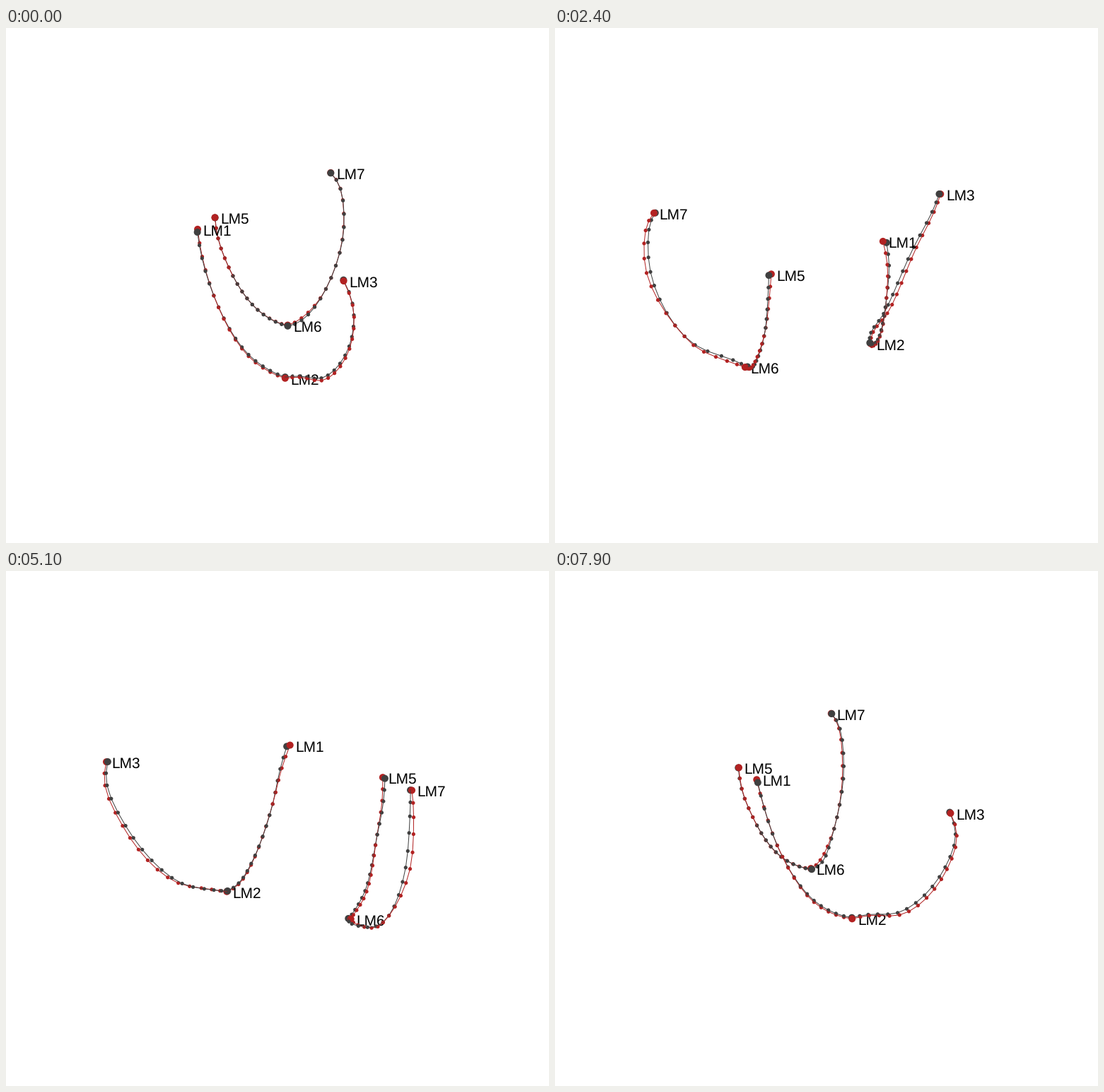
Write a matplotlib script that moves like this. It is 768x729 px and loops after 8000 ms.

```python
import numpy as np
import matplotlib.pyplot as plt
from matplotlib.animation import FuncAnimation

W, H, DPI = 768, 729, 100
FRAMES, STEP_MS = 80, 100
TURN = 2 * np.pi * 8 / 60 * STEP_MS / 1000         # 8 turns per minute
TILT = np.radians(20)
CAMERA = H / 2 / np.tan(np.radians(15))            # 30 degree field of view
RED, GREY = "#b22222", "#404040"
PX = 72 / DPI

plt.rcParams["text.hinting"] = "none"


def spline(knots, values, t):
    """Cubic Hermite curve through the values given at the knots."""
    knots, values = np.array(knots, float), np.array(values, float)
    slope = np.gradient(values, knots, axis=0, edge_order=2)
    i = np.clip(np.searchsorted(knots, t, "right") - 1, 0, len(knots) - 2)
    h = (knots[i + 1] - knots[i])[:, None]
    s = (t - knots[i])[:, None] / h
    return ((1 + 2 * s) * (1 - s) ** 2 * values[i]
            + s * (1 - s) ** 2 * h * slope[i]
            + s * s * (3 - 2 * s) * values[i + 1]
            + s * s * (s - 1) * h * slope[i + 1])


# An arch is two smooth halves of 17 points that meet in a kink.
HALF = [0, 2, 5, 11, 14, 16]
ARCH_A = [(-108, 89.5, 35.5), (-102, 55, 43.5), (-87, 3, 49), (-40, -79, 62.5),
          (-10, -100.5, 68.5), (10.5, -106.5, 76.5), (30, -99.5, 88.5),
          (58, -85, 125), (91, 4, 194.5), (88, 59, 224), (76.5, 90, 228.5)]
ARCH_B = [(-94.5, 64, -124.5), (-90.5, 31, -125), (-75, -15, -123),
          (-31, -85.5, -123), (-3, -104, -119), (16, -110, -116.5),
          (38, -106, -130), (69.5, -86.5, -175.5), (108, 19.5, -223.5),
          (101, 83.5, -223.5), (84.5, 111, -217.5)]

# Height and depth by which the red arch strays from the grey one.
STRAY = [0, 5, 12, 16, 18, 22, 28, 32]
STRAY_A = [(2.5, -5.3), (.2, 0), (-2.4, .3), (-1.2, 1.2),
           (.2, 3.7), (-.7, 7), (-.9, 4.5), (-.4, 2.3)]
STRAY_B = [(1.2, 3.3), (0, .3), (-.7, -2.6), (0, -3.6),
           (.2, -9), (0, -.4), (-.8, -6), (0, -1.8)]


def arch(keys):
    t = np.arange(17)
    return np.vstack([spline(HALF, keys[:6], t), spline(HALF, keys[5:], t)[1:]])


def strayed(points, stray):
    return points + np.pad(spline(STRAY, stray, np.arange(33)), [(0, 0), (1, 0)])


def project(points, angle):
    """Screen x, screen y and nearness of points turned about the upright axis."""
    x, y, z = points.T
    c, s = np.cos(angle), np.sin(angle)
    x, z = x * c + z * s, z * c - x * s
    near = z * np.cos(TILT) + y * np.sin(TILT)
    up = y * np.cos(TILT) - z * np.sin(TILT)
    q = 1 - near / CAMERA
    return W / 2 + x / q, H / 2 - up / q, near


fig = plt.figure(figsize=(W / DPI, H / DPI), dpi=DPI, facecolor="white")
ax = fig.add_axes([0, 0, 1, 1])
ax.set_xlim(0, W)
ax.set_ylim(H, 0)
ax.axis("off")


class Strand:
    def __init__(self, points, color, names=()):
        self.points = points
        self.lines = [ax.plot([], [], color=color, lw=PX)[0] for _ in points[1:]]
        self.dots = [ax.add_patch(plt.Circle((0, 0), 2.6 if i % 16 else 5,
                                             color=color, lw=0))
                     for i in range(len(points))]
        self.labels = [ax.text(0, 0, name, fontsize=15, color="black",
                               family="Liberation Sans", va="baseline")
                       for name in names]

    def draw(self, angle):
        x, y, near = project(self.points, angle)
        order = near + 1000
        for i, line in enumerate(self.lines):
            line.set_data(x[i:i + 2], y[i:i + 2])
            line.set_zorder(order[i:i + 2].mean() - 0.5)
        for i, dot in enumerate(self.dots):
            dot.center = x[i], y[i]
            dot.set_zorder(order[i])
        for i, label in enumerate(self.labels):
            label.set_position((x[16 * i] + 7.6, y[16 * i] + 9))
            label.set_zorder(order[16 * i] + 0.1)


grey_a, grey_b = arch(ARCH_A), arch(ARCH_B)
strands = [Strand(grey_a, GREY), Strand(grey_b, GREY),
           Strand(strayed(grey_a, STRAY_A), RED, ("LM1", "LM2", "LM3")),
           Strand(strayed(grey_b, STRAY_B), RED, ("LM5", "LM6", "LM7"))]


def update(frame):
    for strand in strands:
        strand.draw(TURN * frame)
    return []


anim = FuncAnimation(fig, update, frames=FRAMES, interval=STEP_MS,
                     init_func=lambda: update(0), repeat=True, repeat_delay=0)
plt.show()
```
